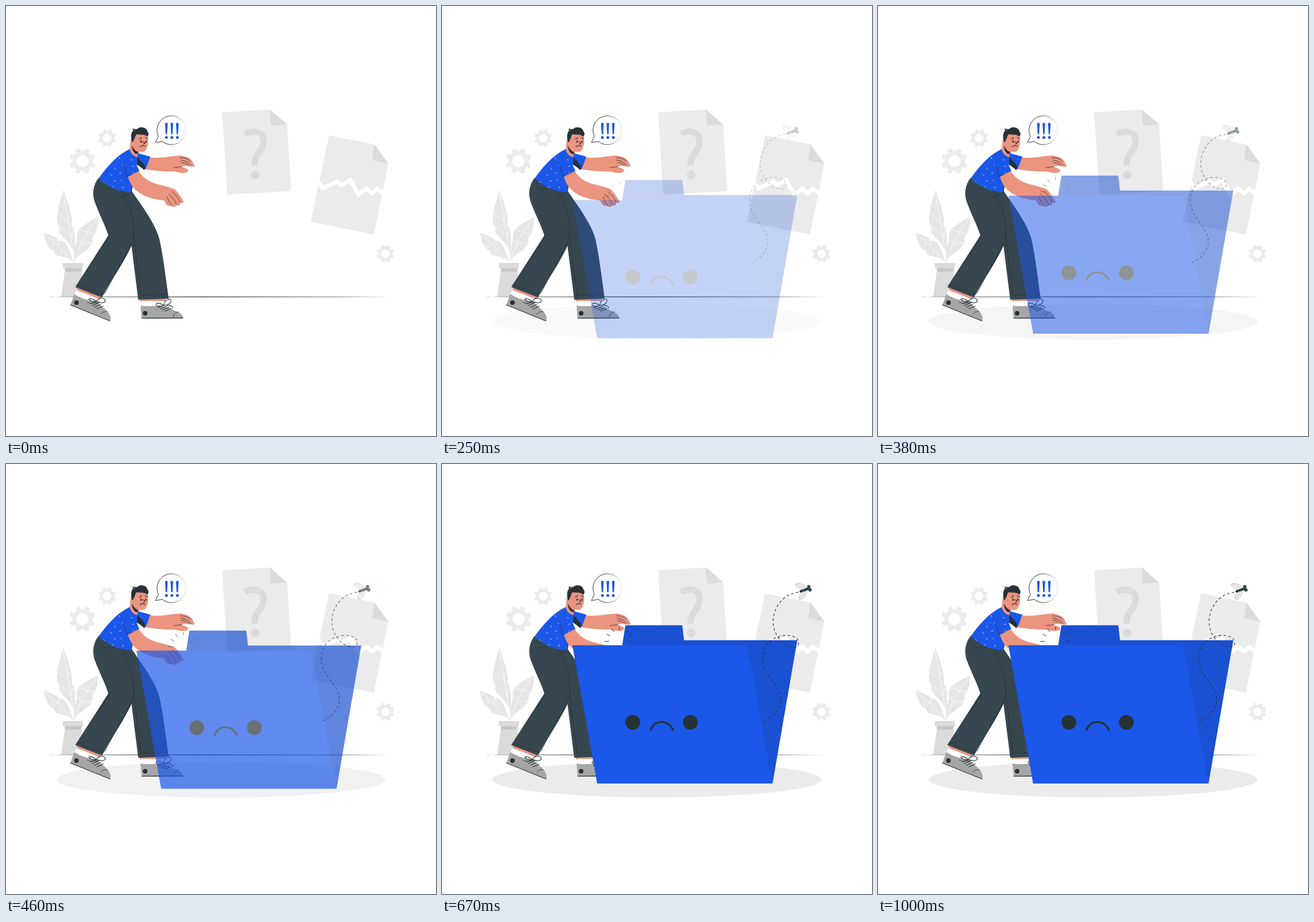
Write an HTML page that moves like this. It is 748 px wide and 748 px high and loops after 1.04 s.

```html
<!DOCTYPE html>
<html lang="en">
<head>
<meta charset="utf-8">
<title>Folder error</title>
<style>
  html, body { margin: 0; width: 100%; height: 100%; overflow: hidden; background: #fff; }
  svg { display: block; width: 100vw; height: 100vh; }
  .paper { fill: #ebebeb; }
  .fold { fill: #dbdbdb; }
  .skin { fill: #eb947f; }
  .blue { fill: #1b57e8; }
  .dark { fill: #263238; }
  .pants { fill: #37474f; }
  .shoe { fill: #a6a6a6; }
  .line { fill: none; stroke: #263238; stroke-linecap: round; stroke-linejoin: round; }
  .vein { fill: none; stroke: #fff; stroke-width: .9; }
  .gear circle { fill: none; stroke: #ebebeb; }
</style>
</head>
<body>
<svg viewBox="0 0 748 748">
  <defs>
    <linearGradient id="floorInk" gradientUnits="userSpaceOnUse" x1="75" y1="0" x2="668" y2="0">
      <stop offset="0" stop-color="#263238" stop-opacity=".1"/>
      <stop offset=".12" stop-color="#263238" stop-opacity=".45"/>
      <stop offset=".45" stop-color="#263238" stop-opacity=".85"/>
      <stop offset=".85" stop-color="#263238" stop-opacity=".45"/>
      <stop offset="1" stop-color="#263238" stop-opacity="0"/>
    </linearGradient>
    <linearGradient id="bubbleInk">
      <stop offset=".4" stop-color="#263238"/>
      <stop offset="1" stop-color="#263238" stop-opacity=".12"/>
    </linearGradient>
    <path id="shirt" d="M215 249C204 254 194 262 186 270C176 280 168 290 161 300C178 315 198 324 218 324C221 315 221 304 217 297L232 287L227 276L243 284L251 262L230 263C222 262 217 257 215 249Z"/>
    <clipPath id="shirtClip"><use href="#shirt"/></clipPath>
  </defs>

  <!-- papers -->
  <path class="paper" d="M376 185L459 180L489 206L496 322L385 328Z"/>
  <path class="fold" d="M459 180L461 208L489 206Z"/>
  <path d="M415.500 222.500C433 214 449 220 448 237C447 254 431 258 432.500 278" fill="none" stroke="#dbdbdb" stroke-width="11"/>
  <circle class="fold" cx="433.500" cy="294" r="7.500"/>
  <path class="paper" d="M562 225L641 241L665 274L640 397.500L530 375.500Z"/>
  <path class="fold" d="M641 241L637 268L665 274Z"/>
  <path d="M542 304L551 317L576 305.500L583 311.500L599 303L613 328L627 318L636 326L645 318.500L659 327" fill="none" stroke="#fff" stroke-width="7.200"/>

  <g id="gears" class="gear"></g>

  <!-- plant -->
  <g fill="#e6e6e6">
    <path d="M100 320C93 340 87 364 89 377C91 384 95 385 92 391C97 405 112 408 118 430C121 418 121 402 117 385C112 383 115 378 115 373C112 352 105 335 100 320Z"/>
    <path d="M160 368C144 375 128 384 124 394C122 401 125 405 122 412C119 424 120 434 119 445C125 430 144 427 150 412C152 405 148 404 154 398C159 388 160 379 160 368Z"/>
    <path d="M66 395C68 408 72 418 78 423C84 424 83 428 86 432C95 438 107 434 117 446C113 433 109 418 101 410C96 407 94 410 91 406C84 400 75 397 66 395Z"/>
  </g>
  <path class="vein" d="M100 326C106 365 114 400 119 447M158 371C142 390 126 416 119 447M69 398C88 415 104 428 116 447"/>
  <path class="vein" d="M92 362L105 374M91 382L109 396M112 361L105 372M116 390L113 404M128 389L140 393M125 408L132 410M154 396L141 394M150 412L131 414M78 421L84 412M93 435L97 426M92 406L90 417"/>
  <path d="M119 446V410" stroke="#e6e6e6" stroke-width="1.500"/>
  <path class="fold" d="M103 456H131L137 506H96Z"/>
  <path d="M102 456H132L130 462H103Z" fill="#c7c7c7"/>
  <path class="fold" d="M99 447H134V456H99Z"/>

  <ellipse id="shadow" class="paper" cx="374" cy="549" rx="286" ry="31"/>
  <path d="M77 506H668" stroke="url(#floorInk)" stroke-width="1.300" stroke-dasharray="8 4 700"/>

  <!-- speech bubble -->
  <path d="M265 226.500A25 25 0 1 1 272 235.500L260 237.500Z" fill="#fff" stroke="url(#bubbleInk)"/>
  <g id="alarm" class="blue"></g>

  <!-- shoes and ankles -->
  <path class="skin" d="M124 488L166 505L163 510L123 494Z"/>
  <path d="M122 494L160 509L150 517L119 503Z" fill="#fff"/>
  <path class="shoe" d="M119 501C126 506 136 510 146 512L158 515L172 527C180 534 184 541 181 548L112 520Z"/>
  <path class="line" d="M112 520L181 548" stroke-width="1.200"/>
  <path class="line" d="M165 536C168 532 172 531 176 532M141 515C148 519 154 516 160 516" stroke-width=".8"/>
  <path class="line" d="M147 518L158 514M150 521L162 516M154 524L165 519M158 527L169 522M157 514C146 506 140 509 148 513C153 515 157 514 157 514C163 505 172 508 173 513C169 519 162 515 157 514" stroke-width="1.200"/>
  <circle class="dark" cx="122.500" cy="516" r="4"/>
  <path class="skin" d="M233 508H278V514H233Z"/>
  <path d="M235 513H276L274 522H234Z" fill="#fff"/>
  <path class="shoe" d="M234 521C245 523 255 522 266 521L280 524L296 531C304 534 308 538 308 544H236Z"/>
  <path class="line" d="M236 543L308 542.500" stroke-width="1.200"/>
  <path class="line" d="M291 541C292 535 296 532 300 532" stroke-width=".8"/>
  <path class="line" d="M264 525L276 520M268 527L280 522M272 529L284 524M276 531L287 526M274 521C263 513 257 519 264 522C269 523 274 521 274 521C276 511 285 507 287 512C288 518 279 521 274 521C281 519 290 521 290 526" stroke-width="1.100"/>
  <circle class="dark" cx="242" cy="534.500" r="4"/>

  <!-- trousers -->
  <path class="pants" d="M205 316L218 321C236 347 260 379 267 406C274 438 278 474 283 509L230 511L218 415Z"/>
  <path class="pants" d="M161 299C151 312 150 327 154 340C162 362 172 380 178 399L120.500 489L167 507C184 474 207 445 222 409C227 390 222 350 218 322C196 323 178 313 161 299Z"/>
  <path class="line" d="M123 484.500L169 502M233 503L281 501.500M203 324C217 350 224 377 222 401C218 420 190 463 172 500M222 401L235 502M167 317C172 321 178 319 182 317M198 332C206 332 212 328 215 324M179 399C181 399 182 397 183 395M127 480L181 400" stroke-width=".9"/>

  <!-- far arm, neck and head -->
  <path class="skin" d="M247 263C267 266 286 261 303 260C313 261 320 264 324 270L328 278C327 281 321 279 316 278L305 279C310 282 318 283 317 287C314 292 302 291 294 288C277 288 260 287 242 284Z"/>
  <path class="line" d="M303 264C311 264 317 266 321 270M304 268C311 269 318 272 322 277M305 272C311 273 316 275 319 278M292 281C297 281 302 280 306 279" stroke-width=".8"/>
  <path class="skin" d="M217 231L215 250C217 260 224 266 232 264L231 246Z"/>
  <path class="dark" d="M219 243C222 248 225 253 230 254L228 258C222 256 219 250 219 243Z"/>
  <path class="skin" d="M222 221L246 222C249 236 247 247 241 253C233 256 225 251 221 241C217 241 216 233 220 232Z"/>
  <path class="dark" d="M219 236C217 228 217 221 221 217C225 215 228 214 232 211.500C239 210 245 213 246 218C249 221 248 226 245.500 227C240 222 234 225 227 223C224 226 225 231 222 233L221 237Z"/>
  <path class="line" d="M222 218L221 214L226 215" stroke-width="1.500"/>
  <path class="line" d="M232 232L236 229M242 229L246 231M239 236L242 239L239 240M233 245C236 242 239 242 242 244" stroke-width="1.100"/>
  <ellipse class="dark" cx="235" cy="236" rx="1.300" ry="2"/>
  <ellipse class="dark" cx="243.500" cy="236" rx="1.200" ry="2"/>

  <!-- shirt -->
  <use href="#shirt" class="blue"/>
  <g id="flecks" clip-path="url(#shirtClip)" stroke="#c5d5fa" stroke-width=".9"></g>
  <path class="dark" d="M229 262L243 270L241 286L228 275Z"/>
  <path class="blue" d="M229 256L251 262L243 279L229 263Z"/>
  <path class="line" d="M204 276C207 284 209 291 211 297L231 287M218 324C220 315 221 304 217 297" stroke-width=".8"/>

  <!-- near arm -->
  <path class="skin" d="M212 297L231 287C239 301 253 308 268 311C278 314 288 316 294 319C301 327 306 334 309 341C308 344 305 343 303 341C304 346 301 349 297 346C295 350 290 351 287 347C283 350 278 346 275 338C258 337 240 332 228 322C219 315 215 306 212 297Z"/>
  <path class="line" d="M289 323C296 328 300 335 303 341M283 327C290 333 294 339 297 346M280 332C283 339 285 343 288 347" stroke-width=".8"/>

  <!-- folder -->
  <g id="folder">
    <path d="M319 280.500H418L421 306.500H618L575 555.500H270L227 315.500H313.500Z" fill="#1a50d2"/>
    <path d="M315 306.500H421" stroke="#1b57e8"/>
    <path class="blue" d="M227 315.500H531L575 555.500H270Z"/>
    <circle class="dark" cx="332" cy="449.500" r="12.800"/>
    <circle class="dark" cx="432" cy="449.500" r="12.800"/>
    <path class="line" d="M363 462.500C369 444 394 444 401.500 462.500" stroke-width="3.200"/>
    <path class="line" d="M287 296L292 299M283 308.500H290M295 287L299 292M308.500 284L309 288M331 295L326 298M328 308H333" stroke-width="1"/>
  </g>

  <!-- fly -->
  <g id="fly">
    <path class="line" d="M620 223C586 227 570 262 578 288C586 311 603 320 616 318C626 311 619 298 599 298C570 299 552 322 559 349C565 374 592 390 589 413C586 432 570 444 555 448" stroke-width="1.100" stroke-dasharray="4.500 4" style="stroke-linecap:butt"/>
    <g fill="#ededed" stroke="#aaa" stroke-width=".6">
      <ellipse cx="624" cy="213" rx="10" ry="4.500" transform="rotate(22 624 213)"/>
      <ellipse cx="627" cy="228" rx="9" ry="4.500" transform="rotate(-52 627 228)"/>
      <path d="M616 209L633 217M622 235L632 220" fill="none"/>
    </g>
    <path class="line" d="M624 221.500L637 217" stroke-width="4.200"/>
    <path d="M626 219L628 222M630 218L631 221" stroke="#78909c" stroke-width=".8"/>
    <g class="pants"><circle cx="638" cy="213.500" r="3"/><circle cx="640" cy="219" r="3"/></g>
  </g>
</svg>
<script>
const el = id => document.getElementById(id);

// Gears: a solid ring plus a dashed ring with eight teeth
const gear = (x, y, outer, hole) => {
  const body = outer * .8, tooth = outer - body + 1;
  return `<g transform="translate(${x} ${y}) rotate(12)">
    <circle r="${(hole + body) / 2}" stroke-width="${body - hole}"/>
    <circle r="${outer - tooth / 2}" stroke-width="${tooth}" pathLength="16" stroke-dasharray="1"/></g>`;
};
el('gears').innerHTML = gear(133, 270, 22.5, 10.5) + gear(176, 230, 15.5, 7.5) + gear(660, 431, 15.8, 7.5);

el('alarm').innerHTML = [279, 288.5, 298].map(x =>
  `<path d="M${x - 2.3} 203.500h4.600l-1.100 19.500h-2.400z"/><circle cx="${x}" cy="228.800" r="2.500"/>`).join('');

// Short pale dashes on a jittered grid over the shirt
let flecks = '';
for (let i = 0; i < 30; i++) {
  const x = 168 + i % 5 * 17 + Math.sin(i * 7) * 4;
  const y = 257 + Math.floor(i / 5) * 12 + Math.cos(i * 5) * 3;
  flecks += `<path d="M${x} ${y}h3.600" transform="rotate(${i * 137} ${x} ${y})"/>`;
}
el('flecks').innerHTML = flecks;

const LOOP = 1040, STEPS = 24, SLIDE = 30;
const cubic = (a, b, s) => 3 * a * s * (1 - s) ** 2 + 3 * b * s * s * (1 - s) + s ** 3;

// Eased progress with a slight overshoot
function ease(p) {
  if (p >= 1) return 1;
  let lo = 0, hi = 1;
  for (let i = 0; i < 24; i++) {
    const mid = (lo + hi) / 2;
    if (cubic(.36, .5, mid) < p) lo = mid; else hi = mid;
  }
  return cubic(-.01, 1.38, lo);
}

function draw(now) {
  const step = Math.min(STEPS, Math.floor((now % LOOP + 4) * STEPS / 1000));
  const y = step ? ease((step + .4) / STEPS) : 0;
  const gap = SLIDE * (1 - y);
  const alpha = Math.max(0, Math.min(1, y));
  for (const id of ['shadow', 'folder', 'fly']) el(id).setAttribute('opacity', alpha);
  el('folder').setAttribute('transform', `translate(0 ${gap})`);
  el('fly').setAttribute('transform', `translate(${-gap} 0)`);
}

const start = performance.now();
(function tick() {
  draw(performance.now() - start);
  requestAnimationFrame(tick);
})();
</script>
</body>
</html>
```
